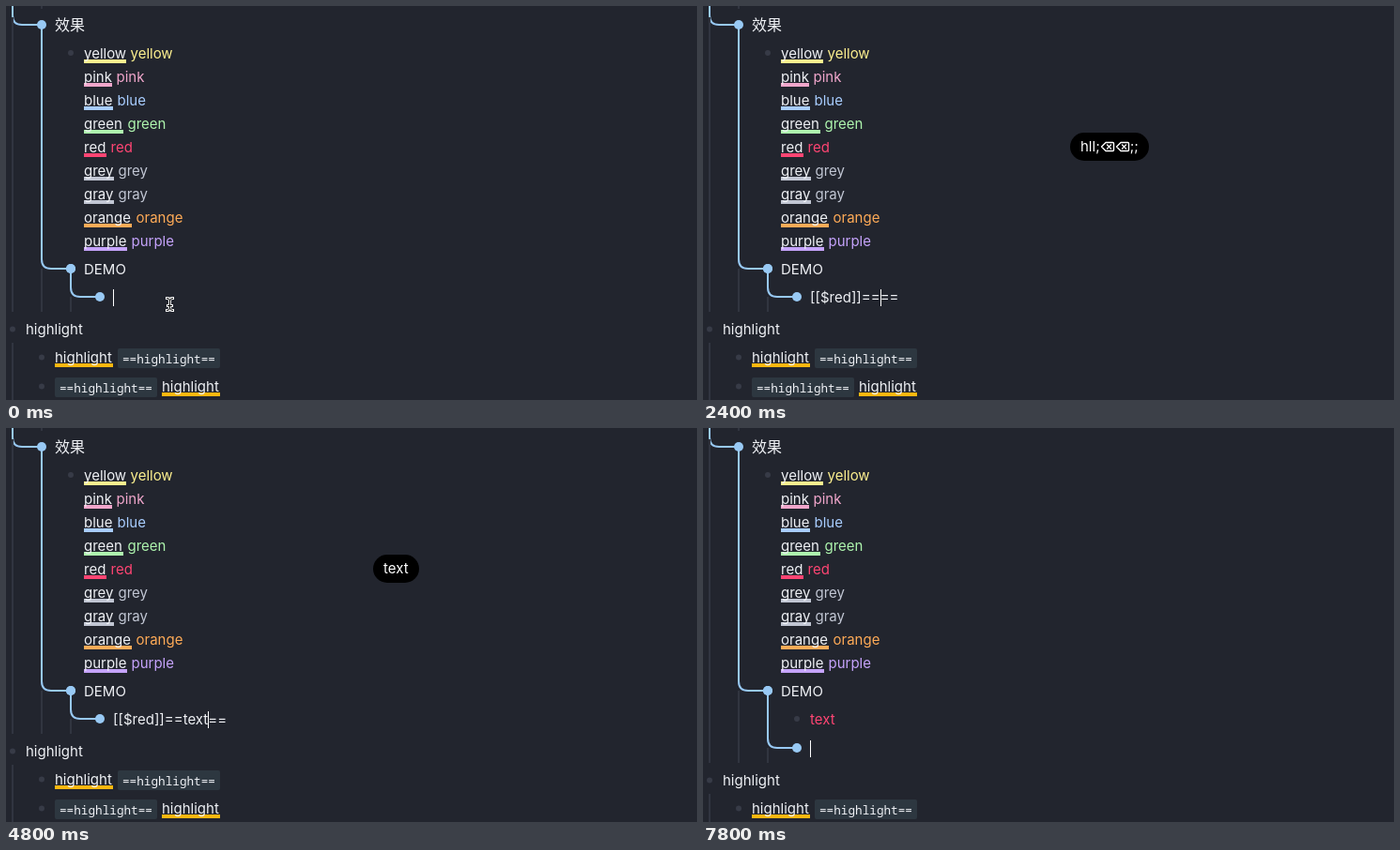
Write an HTML page that moves like this. It is 736 by 420 pixels and loops after 8 s.

```html
<!DOCTYPE html>
<html lang="zh-CN">
<head>
<meta charset="utf-8">
<style>
html, body { margin: 0; width: 100%; height: 100%; overflow: hidden; background: #22252e; }
#stage { position: absolute; left: 0; top: 0; width: 736px; height: 420px; overflow: hidden; }
#stage > svg { position: absolute; left: 0; top: 0; }
text { font: 15px Inter, "Noto Sans CJK SC", sans-serif; fill: #eff1f5; white-space: pre; }
.cjk { font: 16px "Noto Sans CJK SC", "Noto Sans CJK", sans-serif; }
.mono { font: 12.7px "Noto Sans Mono", monospace; }
.guide { stroke: #313540; stroke-width: 2; fill: none; }
.link { stroke: #98c9f4; stroke-width: 2; fill: none; }
.dot { fill: #98c9f4; }
.bullet { fill: #373b47; }
.bubble {
  position: absolute; left: 391px; height: 30px; padding: 0 11px; border-radius: 15px;
  display: flex; align-items: center; background: #000; color: #fff;
  font: 15px/30px Inter, sans-serif; white-space: pre;
}
.bubble svg { display: block; fill: none; stroke: #fff; stroke-width: 1.4; stroke-linecap: round; stroke-linejoin: round; }
</style>
</head>
<body>
<div id="stage">
  <svg width="736" height="420">
    <g id="outline"></g>
    <g id="branch"></g>
    <text id="line" x="114" y="316"></text>
    <path id="caret" stroke="#fff" stroke-width="1"/>
    <g id="lower"></g>
    <g id="pointer" fill="none" stroke-linecap="square">
      <path id="beam" d="M171.5 311.5Q174.500 311.500 174.500 314V322Q174.500 324.500 171.500 324.500M177.500 311.500Q174.500 311.500 174.500 314M174.500 322Q174.500 324.500 177.500 324.500M172.500 319.500H176.500" stroke="#fff" stroke-width="3"/>
      <use href="#beam"/>
    </g>
  </svg>
  <div class="bubble" id="older"></div>
  <div class="bubble" id="newer"></div>
</div>
<script>
const $ = id => document.getElementById(id);
const LOOP = 8000, STEP = 200, HOLD = 2000, FADE = 400, BLINK = 500;

const text = (x, mid, str, cls = '', style = '') =>
  `<text x="${x}" y="${mid + 5.5}" class="${cls}" style="${style}">${str}</text>`;
const guide = (x, y1, y2) => `<path class="guide" d="M${x} ${y1}V${y2}"/>`;
const dot = (x, y) => `<circle class="dot" cx="${x}" cy="${y}" r="5"/>`;
const bullet = (x, y) => `<circle class="bullet" cx="${x}" cy="${y}" r="3"/>`;
const link = (x, y1, y2) => `<path class="link" d="M${x} ${y1}V${y2 - 10}q0 10 10 10h21"/>`;
const marked = (x, mid, str, width, color) =>
  `<rect x="${x}" y="${mid + 6.5}" width="${width}" height="4" fill="${color}"/>` + text(x, mid, str);
const code = (x, mid) =>
  `<rect x="${x}" y="${mid - 9.5}" width="109" height="21" rx="2" fill="#2d3740"/>` +
  text(x + 5, mid + .5, '==highlight==', 'mono');

const words = [
  ['yellow', 45, '#fdf08f'], ['pink', 30, '#f0a6cb'], ['blue', 31, '#a8cdff'],
  ['green', 42, '#aef5ae'], ['red', 24, '#ff4573'], ['grey', 32, '#c1c6d3'],
  ['gray', 32, '#c1c6d3'], ['orange', 51, '#ffab57'], ['purple', 46, '#c5a3fb'],
];

$('outline').innerHTML =
  guide(38, 0, 3) + link(7, -5, 20) + link(38, 20, 280) +
  dot(38, 20) + dot(69, 280) + bullet(69, 50) +
  text(52, 20, '效果', 'cjk') +
  words.map(([word, width, color], i) => {
    const mid = 50.5 + i * 25;
    return marked(83, mid, word, width, color) + text(83 + width + 4.5, mid, word, '', `fill:${color}`);
  }).join('') +
  text(83, 280.5, 'DEMO');

$('lower').innerHTML =
  bullet(7, 344.5) + text(21, 344.5, 'highlight') + guide(7, 359, 440) +
  bullet(38, 374.5) + marked(52, 374.5, 'highlight', 62, '#ffb70f') + code(119, 374.5) +
  bullet(38, 405.5) + code(52, 405.5) + marked(166, 405.5, 'highlight', 62, '#ffb70f');

const branches = [310, 341].map((y, added) =>
  guide(7, 12, y + 16) + guide(38, 280, y + 16) + guide(69, y, y + 16) +
  link(69, 280, y) + dot(69, 280) + dot(100, y) +
  (added ? bullet(100, 310) + text(114, 310.5, 'text', '', 'fill:#ff4573') : ''));

const icon = (width, d) => `<svg width="${width}" height="16"><path d="${d}"/></svg>`;
const icons = {
  '⌫': icon(16, 'M6 3.500H13.500Q14.500 3.500 14.500 4.500V11.500Q14.500 12.500 13.500 12.500H6L1.500 8ZM7.500 6L11.500 10M11.500 6L7.500 10'),
  '→': icon(14, 'M1 8h.1M4 8h.1M7 8h.1M10 8h3M10.500 5.800L13 8L10.500 10.200'),
  '⏎': icon(16, 'M5 4.500L1.500 8L5 11.500M2 8H11Q14 8 14 5.500Q14 3 11.500 3H10.500'),
};

// start time, text before caret, text after caret
const edits = [
  [0, '', ''], [400, 'h', ''], [600, 'hl', ''], [800, 'hll', ''], [1000, 'hll;', ''],
  [1400, 'hl', ''], [1600, 'hl;', ''], [1800, '[[$red]]====', ''], [2000, '[[$red]]==', '=='],
  [2800, '[[$red]]==t', '=='], [3000, '[[$red]]==te', '=='], [3200, '[[$red]]==tex', '=='],
  [3400, '[[$red]]==text', '=='], [5000, '[[$red]]==text=', '='], [5200, '[[$red]]==text==', ''],
  [5600, '', ''],
];

// each burst of keys: [time, keys so far]
const bursts = [
  [[400, 'h'], [600, 'hl'], [800, 'hll'], [1000, 'hll;'], [1400, 'hll;⌫⌫'], [1600, 'hll;⌫⌫;;']],
  [[2800, 't'], [3000, 'te'], [3200, 'tex'], [3400, 'text']],
  [[5000, '→'], [5200, '→→'], [5400, '→→⏎']],
];

const latest = (rows, t) => rows.filter(row => row[0] <= t).pop();

function showBubble(el, burst, t, top) {
  const row = burst && latest(burst, t);
  const opacity = row ? Math.max(0, Math.min(1, 1 - (t - row[0] - HOLD) / FADE)) : 0;
  el.style.opacity = opacity;
  el.style.top = top + 'px';
  if (!opacity || el.dataset.keys === row[1]) return;
  el.dataset.keys = row[1];
  el.innerHTML = row[1].replace(/[⌫→⏎]|[^⌫→⏎]+/g, s => icons[s] || `<span>${s}</span>`);
}

let shown = -1;
function draw(t) {
  const [since, before, after] = latest(edits, t);
  const added = t >= 5600 ? 1 : 0;
  const line = $('line');
  line.textContent = before + after;
  const x = Math.round(114 + (before ? line.getSubStringLength(0, before.length) : 0)) + .5;
  $('caret').setAttribute('d', `M${x} ${302 + added * 31}v18`);
  $('caret').style.opacity = Math.floor((t - since) / BLINK) % 2 ? 0 : 1;
  if (shown < 0 || $('branch').dataset.added !== String(added)) {
    $('branch').dataset.added = added;
    $('branch').innerHTML = branches[added];
  }
  $('lower').setAttribute('transform', `translate(0 ${added * 31})`);
  $('pointer').style.display = t < 400 ? '' : 'none';

  const active = bursts.filter(burst => burst[0][0] <= t);
  showBubble($('newer'), active[active.length - 1], t, 135);
  showBubble($('older'), active[active.length - 2], t, 94.5);
  shown = t;
}

$('pointer').querySelector('use').outerHTML =
  `<path d="${$('beam').getAttribute('d')}" stroke="#000"/>`;

function tick() {
  const t = Math.floor(performance.now() % LOOP / STEP) * STEP;
  if (t !== shown) draw(t);
  requestAnimationFrame(tick);
}
tick();
</script>
</body>
</html>
```
